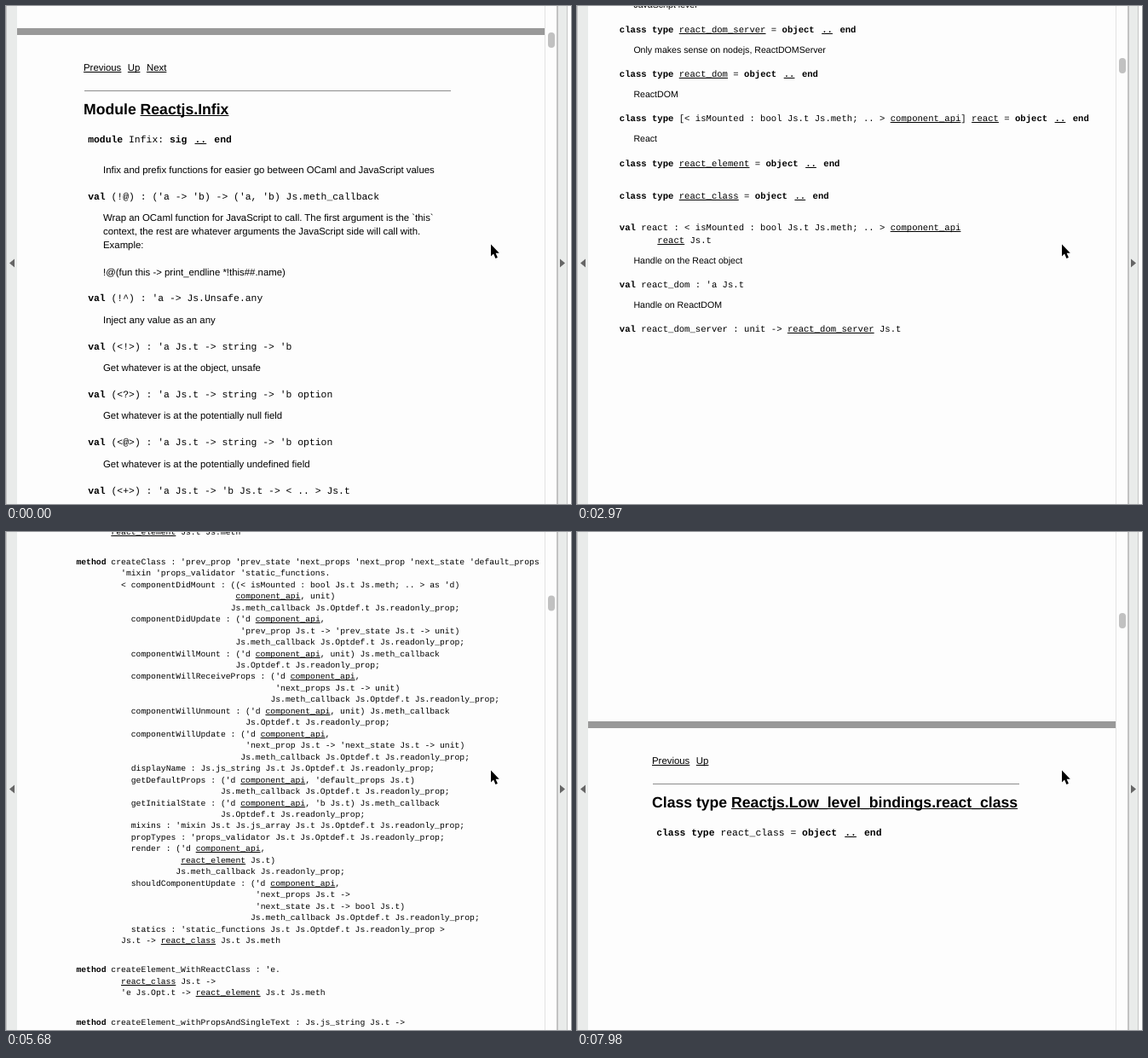
Recreate the animation shown at these times as an HTML page. Size 663 px wide and 584 px high, loop 8000 ms.

```html
<!DOCTYPE html>
<html lang="en">
<head>
<meta charset="utf-8">
<title>Module documentation</title>
<style>
html, body { margin: 0; width: 100%; height: 100%; overflow: hidden; background: #fff; }
#stage { position: relative; width: 663px; height: 584px; overflow: hidden; background: #fff; }
#stage div, #stage svg, .ln { position: absolute; }
#view { left: 13px; top: 0; width: 619px; height: 584px; overflow: hidden; background: #fdfdfd; }
#bands, #doc { left: -13px; top: 0; width: 0; height: 0; }
.band { left: 13px; width: 619px; height: 8px; background: #999; }
.page { left: 0; width: 617px; height: 960px; overflow: hidden; color: #000; text-rendering: geometricPrecision; }
.ln { white-space: pre; line-height: 14px; font-size: 1em; font-family: "Liberation Sans", Arial, sans-serif; }
.code { font-family: "Liberation Mono", "Courier New", monospace; margin-top: .07em; }
.title { font-size: 1.548em; line-height: 20px; margin-top: -3px; font-weight: bold; }
.rule { height: 1px; background: #8c8c8c; }
u { text-decoration-thickness: 1px; text-decoration-skip-ink: none; }
.nav u { margin-right: .66em; }
u.dots { margin: 0 .2em; font-weight: bold; }
.side { top: 0; height: 584px; background: #e9ebea; box-sizing: border-box; }
#left { left: 0; width: 13px; border-left: 1px solid #c4c4c4; }
#track { left: 632px; top: 0; width: 14px; height: 584px; background: #fdfdfd; border-left: 1px solid #e2e2e2; box-sizing: border-box; }
#right { left: 646px; width: 13px; border-left: 2px solid #c2c2c2; border-right: 1px solid #c4c4c4; }
#thumb { left: 636px; top: 0; width: 8px; height: 18px; border-radius: 4px; background: #c1c1c1; }
#over { left: 0; top: 0; }
</style>
</head>
<body>
<div id="stage">
  <div id="view"><div id="bands"></div><div id="doc"></div></div>
  <div id="left" class="side"></div>
  <div id="track"></div>
  <div id="right" class="side"></div>
  <div id="thumb"></div>
  <svg id="over" width="663" height="584">
    <path d="M4 301.5l6-5v10zM656 301.5l-6-5v10z" fill="#666"/>
    <path id="arrow" d="M569 279.5v14l3.1-2.9 2.3 5.4 2.5-1.1-2.3-5.2h4.2z" fill="#000" stroke="#fff" stroke-width="1.2" paint-order="stroke"/>
    <path id="beam" d="M565 271.5q3.5 0 3.5 2.5q0-2.5 3.5-2.5M568.5 273.500v12M565 287q3.500 0 3.500-2.500q0 2.500 3.500 2.500M566.500 280.500h4" fill="none" stroke="#000"/>
  </svg>
</div>
<script>
const $ = id => document.getElementById(id);
const FONT = 11.4, LEFT = 60, PITCH = 972, FIRST = 30, LOOP = 8000;
const lines = [];

const esc = s => s.replace(/&/g, '&amp;').replace(/</g, '&lt;').replace(/>/g, '&gt;');
const links = s => s.replace(/\{\.\.\}/g, '<u class="dots">..</u>').replace(/\{(.+?)\}/g, '<u>$1</u>');
const bold = s => s.replace(/\b(class type|module|sig|object|end|val|method)\b/g, '<b>$1</b>');

function box(cls, parent, css) {
  const el = document.createElement('div');
  el.className = cls;
  Object.assign(el.style, css);
  parent.append(el);
  return el;
}

// A page offers helpers that place text at a height below its top break.
function page(index, scale) {
  const top = FIRST + index * PITCH;
  box('band', $('bands'), { top: top - 4 + 'px' });
  const el = box('page', $('doc'), { top: top + 6 + 'px', fontSize: FONT * scale + 'px' });
  const put = (cls, x, y, html) => {
    const ln = document.createElement('span');
    ln.className = 'ln ' + cls;
    ln.style.left = x + 'px';
    ln.style.top = y - 13 + 'px';
    ln.innerHTML = html;
    el.append(ln);
    lines.push({ x, y: top + y, end: Math.min(617, x + ln.offsetWidth) });
  };
  const cell = FONT * scale * .6;
  const p = {
    code: (y, s, col = 0) => put('code', LEFT + 5.2 * scale + col * cell, y, bold(links(esc(s)))),
    text: (y, s) => put('', LEFT + 23 * scale, y, esc(s)),
    head(navY, ruleY, titleY, nav, title) {
      put('nav', LEFT, navY, links(nav.split(' ').map(w => `{${w}}`).join('')));
      box('rule', el, { left: LEFT + 1 + 'px', top: ruleY - 6.5 + 'px', width: 430 * scale + 'px' });
      put('title', LEFT, titleY, links(title));
    },
    // Each block holds rows; a leading number gives the column.
    methods(y, blocks) {
      for (const b of blocks) {
        for (const row of b.trim().split('\n')) {
          const [, col, s] = row.match(/^(\d*)\|?(.*)$/);
          p.code(y, s, +col);
          y += 13.46;
        }
        y += 20.9;
      }
    },
    values(y, items) {
      for (const [sig, note] of items) {
        p.code(y, 'val ' + sig);
        p.text(y + 25, note);
        y += 56.3;
      }
    }
  };
  return p;
}

let p = page(0, 1);
p.head(43, 69, 90.5, 'Previous Up Next', 'Module {Reactjs.Infix}');
p.code(127, 'module Infix: sig {..} end');
p.text(163, 'Infix and prefix functions for easier go between OCaml and JavaScript values');
p.code(194, "val (!@) : ('a -> 'b) -> ('a, 'b) Js.meth_callback");
p.text(219, 'Wrap an OCaml function for JavaScript to call. The first argument is the `this`');
p.text(235, 'context, the rest are whatever arguments the JavaScript side will call with.');
p.text(251, 'Example:');
p.text(283, '!@(fun this -> print_endline *!this##.name)');
p.values(313.7, [
  ["(!^) : 'a -> Js.Unsafe.any", 'Inject any value as an any'],
  ["(<!>) : 'a Js.t -> string -> 'b", 'Get whatever is at the object, unsafe'],
  ["(<?>) : 'a Js.t -> string -> 'b option", 'Get whatever is at the potentially null field'],
  ["(<@>) : 'a Js.t -> string -> 'b option", 'Get whatever is at the potentially undefined field'],
  ["(<+>) : 'a Js.t -> 'b Js.t -> < .. > Js.t", 'Merge two JavaScript objects'],
  ["(!!) : ('a -> 'b) -> ('a -> 'b) Js.callback", 'Wrap an OCaml function'],
  ["(!*) : string -> Js.js_string Js.t", 'Turn an OCaml string into a JavaScript string'],
  ["(*!) : Js.js_string Js.t -> string", 'Turn a JavaScript string into an OCaml string'],
  ["(!%) : 'a list -> 'a Js.js_array Js.t", 'Turn a list into a JavaScript array']
]);

p = page(1, 1);
p.values(64, [
  ["(%!) : 'a Js.js_array Js.t -> 'a list", 'Turn a JavaScript array into a list'],
  ["(!|) : bool -> bool Js.t", 'Turn an OCaml bool into a JavaScript bool'],
  ["(|!) : bool Js.t -> bool", 'Turn a JavaScript bool into an OCaml bool']
]);

p = page(2, .93);
p.head(42.5, 66, 86, 'Previous Up Next', 'Module {Reactjs.Low_level_bindings}');
p.code(119, 'module Low_level_bindings: sig {..} end');
p.text(151, 'Bindings to the JavaScript objects');
p.code(182, "class type {component_api} = object {..} end");
p.text(205, 'Functions available on a component at the');
p.text(220, 'JavaScript level');
p.code(249, 'class type {react_dom_server} = object {..} end');
p.text(272.5, 'Only makes sense on nodejs, ReactDOMServer');
p.code(301.5, 'class type {react_dom} = object {..} end');
p.text(325, 'ReactDOM');
p.code(353.5, 'class type [< isMounted : bool Js.t Js.meth; .. > {component_api}] {react} = object {..} end');
p.text(377, 'React');
p.code(406, 'class type {react_element} = object {..} end');
p.code(444, 'class type {react_class} = object {..} end');
p.code(481.5, 'val react : < isMounted : bool Js.t Js.meth; .. > {component_api}');
p.code(495.8, '{react} Js.t', 7);
p.text(519.5, 'Handle on the React object');
p.code(548.5, "val react_dom : 'a Js.t");
p.text(571.5, 'Handle on ReactDOM');
p.code(600.5, 'val react_dom_server : unit -> {react_dom_server} Js.t');

p = page(3, .8546);
p.head(42, 63.5, 82.5, 'Previous Up Next', 'Class type {Reactjs.Low_level_bindings.react}');
p.code(114, 'class type [< isMounted : bool Js.t Js.meth; .. > {component_api}] react = object {..} end');
p.text(144, 'React');
p.methods(171, [
  "method _DOM : 'a. 'a Js.t Js.readonly_prop",
  `method cloneElement : {react_element} Js.t ->
7|{react_element} Js.t Js.meth`,
  `method createClass : 'prev_prop 'prev_state 'next_props 'next_prop 'next_state 'default_props 'initial_state
9|'mixin 'props_validator 'static_functions.
9|< componentDidMount : ((< isMounted : bool Js.t Js.meth; .. > as 'd)
32|{component_api}, unit)
31|Js.meth_callback Js.Optdef.t Js.readonly_prop;
11|componentDidUpdate : ('d {component_api},
33|'prev_prop Js.t -> 'prev_state Js.t -> unit)
32|Js.meth_callback Js.Optdef.t Js.readonly_prop;
11|componentWillMount : ('d {component_api}, unit) Js.meth_callback
32|Js.Optdef.t Js.readonly_prop;
11|componentWillReceiveProps : ('d {component_api},
40|'next_props Js.t -> unit)
39|Js.meth_callback Js.Optdef.t Js.readonly_prop;
11|componentWillUnmount : ('d {component_api}, unit) Js.meth_callback
34|Js.Optdef.t Js.readonly_prop;
11|componentWillUpdate : ('d {component_api},
34|'next_prop Js.t -> 'next_state Js.t -> unit)
33|Js.meth_callback Js.Optdef.t Js.readonly_prop;
11|displayName : Js.js_string Js.t Js.Optdef.t Js.readonly_prop;
11|getDefaultProps : ('d {component_api}, 'default_props Js.t)
29|Js.meth_callback Js.Optdef.t Js.readonly_prop;
11|getInitialState : ('d {component_api}, 'b Js.t) Js.meth_callback
29|Js.Optdef.t Js.readonly_prop;
11|mixins : 'mixin Js.t Js.js_array Js.t Js.Optdef.t Js.readonly_prop;
11|propTypes : 'props_validator Js.t Js.Optdef.t Js.readonly_prop;
11|render : ('d {component_api},
21|{react_element} Js.t)
20|Js.meth_callback Js.readonly_prop;
11|shouldComponentUpdate : ('d {component_api},
36|'next_props Js.t ->
36|'next_state Js.t -> bool Js.t)
35|Js.meth_callback Js.Optdef.t Js.readonly_prop;
11|statics : 'static_functions Js.t Js.Optdef.t Js.readonly_prop >
9|Js.t -> {react_class} Js.t Js.meth`,
  `method createElement_WithReactClass : 'e.
9|{react_class} Js.t ->
9|'e Js.Opt.t -> {react_element} Js.t Js.meth`,
  `method createElement_withPropsAndSingleText : Js.js_string Js.t ->
7|< className : Js.js_string Js.t Js.readonly_prop > Js.t ->
7|Js.js_string Js.t -> {react_element} Js.t Js.meth`,
  'method createElement_withString : Js.js_string Js.t -> {react_element} Js.t Js.meth',
  `method createFactory : 'new_prop.
9|{react_class} Js.t ->
9|(prop:'new_prop Js.t -> {react_element} Js.t)
9|Js.meth`
]);

p = page(4, .8546);
p.methods(64, [
  "method isValidElement : 'a. 'a Js.t -> bool Js.t Js.meth",
  'method version : Js.js_string Js.t Js.readonly_prop'
]);

p = page(5, 1);
p.head(43, 69, 91, 'Previous Up', 'Class type {Reactjs.Low_level_bindings.react_class}');
p.code(127, 'class type react_class = object {..} end');

// Scroll path: time, distance down, sideways drift.
const path = [
  [0, 0, 31], [270, 0, 31], [1820, 1427, 6], [1910, 1580, 2], [1970, 1728, -2],
  [2060, 1850, -5], [2150, 1963, -8], [2270, 1963, -8], [2970, 2195, -15],
  [4010, 2590, -6], [4620, 2782, 0], [4890, 2934, 6], [5680, 3164, 18],
  [6570, 3625, 17], [7540, 4534, 27], [7980, 4664, 28]
];

// Redraw moments: first, last, count.
const ticks = [0].concat(...[
  [360, 1160, 10], [1250, 1820, 10], [1910, 1970, 2], [2060, 2150, 2], [2360, 2970, 8],
  [3060, 3120, 2], [3210, 4010, 10], [4100, 4620, 7], [4710, 4890, 3], [4970, 5770, 10],
  [5860, 6570, 9], [6650, 6650, 1], [6740, 7540, 12], [7620, 7980, 6]
].map(([a, b, n]) => Array.from({ length: n }, (_, i) =>
  Math.round((a + (n > 1 ? (b - a) * i / (n - 1) : 0)) / 10) * 10)));

function scrollAt(t) {
  const i = Math.max(1, path.findIndex(k => k[0] >= t));
  const a = path[i - 1], b = path[i], f = (t - a[0]) / (b[0] - a[0]);
  return [1, 2].map(n => Math.round(a[n] + (b[n] - a[n]) * f));
}

function draw(time) {
  const [y, x] = scrollAt(ticks.filter(k => k <= time).pop());
  $('bands').style.transform = `translateY(${-y}px)`;
  $('doc').style.transform = `translate(${x}px,${-y}px)`;
  $('thumb').style.transform = `translateY(${(31 + y / 72.9).toFixed(1)}px)`;
  const over = lines.some(l => Math.abs(l.y - y - 279) < 6 && l.x + x < 568 && l.end + x > 568);
  $('arrow').style.display = over ? 'none' : '';
  $('beam').style.display = over ? '' : 'none';
}

const start = performance.now();
(function tick() {
  draw((performance.now() - start) % LOOP);
  requestAnimationFrame(tick);
})();
</script>
</body>
</html>
```
